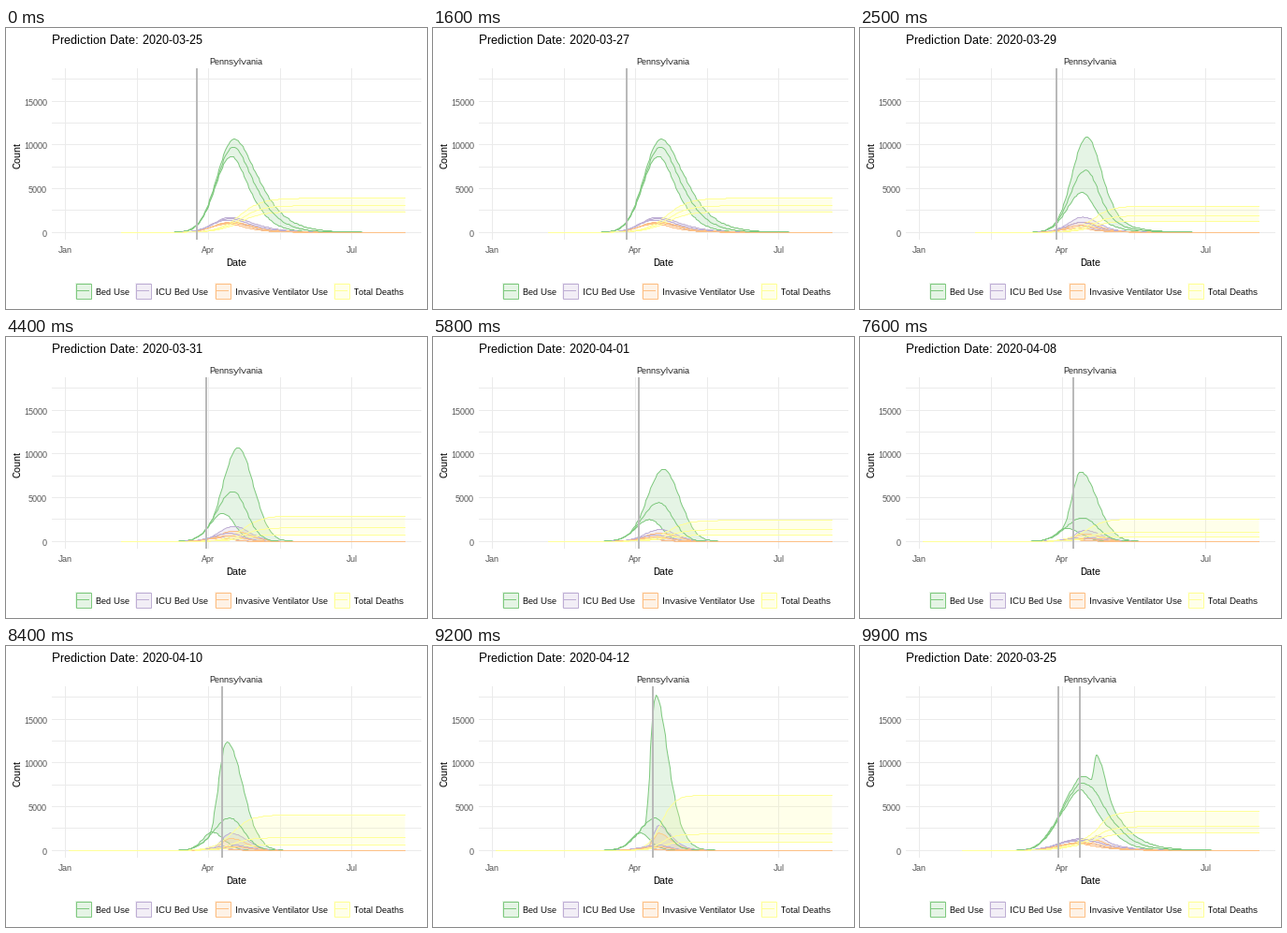
Recreate the animation shown at these times as a matplotlib script. Size 450 by 300 pixels, loop 10 s.

```python
import numpy as np
import matplotlib as mpl
import matplotlib.pyplot as plt
from matplotlib.animation import FuncAnimation
from matplotlib.patches import Polygon, Rectangle

mpl.rcParams.update({
    "font.family": "Liberation Sans",
    "text.hinting": "native",
    "text.hinting_factor": 1,
})

W, H, DPI = 450, 300, 72
LEFT, RIGHT, TOP, BOTTOM = 49, 444, 43, 226
DAY0, DAY_PX = 62.9, 1.684            # x of 1 January, pixels per day
ZERO, COUNT_PX = 218.2, 46.67 / 5000  # y of zero, pixels per count
COLORS = GREEN, PURPLE, ORANGE, YELLOW = "#7FC97F", "#BEAED4", "#FDC086", "#FFFF99"
GRID, RULE, GREY = "#EBEBEB", "#B9B9B9", "#4D4D4D"
ICU, VENT = .16, .11                  # shares of the bed count


def day_x(day):
    return DAY0 + DAY_PX * day


X = day_x(np.arange(3, 217))
LATE = 33  # days skipped by the forecasts that begin in February


def bump(x, h, c, left, right, tail):
    """Bell with separate left and right widths and a slow right tail."""
    z = np.where(x < c, (c - x) / left, (x - c) / right)
    return h * np.exp(-.5 * z * z / np.where(x < c, 1, 1 + tail * z))


def forecast(peaks, centres, lefts, right, totals, shift=-4, tail=0):
    """Counts per day, by group and by upper, middle and lower line."""
    rights = right * np.array([1, .88, .75])

    def beds(x):
        rows = [bump(x, *p, tail) for p in zip(peaks, centres, lefts, rights)]
        rows[0] = np.maximum(rows[0], rows[1])
        return np.array(rows)

    rise = 1 / (1 + np.exp((centres[0] + 6 - X) / (.6 * right)))
    moved = beds(X - shift)
    return np.array([beds(X), ICU * moved, VENT * moved, np.outer(totals, rise)])


A = forecast((10700, 9750, 8700), (244, 243, 241), (18, 17.5, 17), 20,
             (3900, 3050, 2350), tail=.4)
B = forecast((10950, 6250, 3250), (242, 240.5, 235.5), (15, 16, 15), 15.5,
             (2700, 1520, 950))
D = forecast((10700, 5700, 3200), (248, 242.5, 232), (16, 17, 14), 16.5,
             (2900, 1550, 760))
F = forecast((3500, 1720, 960), (235, 235, 228), (14, 18, 17), 20,
             (1100, 700, 480), shift=1)
P = forecast((12350, 3700, 2100), (236, 239, 220), (9, 17, 10), 17,
             (4050, 1450, 600), shift=4)
Q = forecast((17800, 3700, 2000), (238, 238, 222), (5.5, 17, 11), 12,
             (6300, 1850, 950), shift=3, tail=.2)

# date label, day of the year, counts
STATES = [("03-25", 84, A), ("03-26", 85, A), ("03-27", 86, A),
          ("03-29", 88, B), ("03-30", 89, .7 * B + .3 * D), ("03-31", 90, D),
          ("04-01", 91, 1.27 * D), ("04-05", 95, F), ("04-07", 97, F),
          ("04-08", 98, (F + P) / 2), ("04-10", 100, P), ("04-12", 102, Q)]
STARTS = [5, 14, 23, 32, 41, 49, 57, 65, 73, 81, 89, 97]
STEPS = 4


def line(i, group, k):
    first = LATE if i < 9 else 0
    return X[first:], STATES[i][2][group, k, first:]


def pad(x, y, n):
    """Lengthen a line to n points by halving its steepest segments."""
    extra = n - len(x)
    if extra == 0:
        return x, y
    at = np.sort(np.argsort(-np.abs(np.diff(y)), kind="stable")[:extra])
    return (np.insert(x, at + 1, (x[at] + x[at + 1]) / 2),
            np.insert(y, at + 1, (y[at] + y[at + 1]) / 2))


def blend(a, b, t):
    """Mix two lines and put each point on a pixel centre."""
    n = max(len(a[0]), len(b[0]))
    x, y = ((1 - t) * p + t * q for p, q in zip(pad(*a, n), pad(*b, n)))
    return np.column_stack([np.floor(x), np.floor(ZERO - COUNT_PX * y)]) + .5


fig = plt.figure(figsize=(W / DPI, H / DPI), dpi=DPI, facecolor="white")
ax = fig.add_axes([0, 0, 1, 1])
ax.set_xlim(0, W)
ax.set_ylim(H, 0)
ax.axis("off")


def box(x, y, w, h, color, z=0):
    return ax.add_patch(Rectangle((x, y), w, h, fc=color, ec="none", zorder=z))


def label(x, y, s, size=9, color="black", ha="left"):
    return ax.text(x, y, s, fontsize=size, color=color, ha=ha, va="baseline")


# grid and axes
for count in range(0, 17501, 2500):
    row = int(ZERO - COUNT_PX * count)
    box(LEFT, row, RIGHT - LEFT, 1, GRID)
    if count % 5000 == 0:
        label(44, row + 5, str(count), color=GREY, ha="right")
for day in np.linspace(0, 182, 5):
    box(int(day_x(day) + .5), TOP, 1, BOTTOM - TOP, GRID)
for day, month in ((0, "Jan"), (91, "Apr"), (182, "Jul")):
    label(day_x(day), 240, month, color=GREY, ha="center")
label(246, 39, "Pennsylvania", color="#1A1A1A", ha="center")
label(246, 254, "Date", 11, ha="center")
ax.text(18, 136, "Count", fontsize=11, rotation=90, ha="right", va="center")
title = label(49, 17, "", 13)

# legend
names = "Bed Use", "ICU Bed Use", "Invasive Ventilator Use", "Total Deaths"
for x, color, name in zip((74, 138, 223, 350), COLORS, names):
    box(x, 272, 17, 17, mpl.colors.to_rgba(color, .2))
    ax.add_patch(Rectangle((x + .5, 272.5), 16, 16, fill=False, ec=color, lw=1))
    box(x + 2, 280, 13, 1, color, 2)
    label(x + 22, 285, name)

# moving parts
bands, curves = [], []
for g, color in enumerate(COLORS):
    band = Polygon(np.zeros((3, 2)), fc=color, ec="none", alpha=.2, zorder=3 + g)
    bands.append(ax.add_patch(band))
    curves.append([ax.plot([], [], color=color, lw=1, snap=False, zorder=z)[0]
                   for z in (3.5 + g, 7.5 + g, 3.5 + g)])
rule, old_rule = (box(0, TOP, 2, BOTTOM - TOP, RULE, 20) for _ in range(2))


def place(bar, day):
    bar.set_x(int(day_x(day) + .5) - 1)


def draw(n):
    i = sum(s <= n for s in STARTS)
    t = min(1, (n - STARTS[i - 1] + 1) / STEPS) if i else 1
    a, b = max(i - 1, 0), i % len(STATES)
    title.set_text("Prediction Date: 2020-" + STATES[b if t > .5 else a][0])
    place(rule, (1 - t) * STATES[a][1] + t * STATES[b][1])
    place(old_rule, STATES[a][1])
    old_rule.set_visible(i == len(STATES))
    for g, (band, trio) in enumerate(zip(bands, curves)):
        paths = [blend(line(a, g, k), line(b, g, k), t) for k in range(3)]
        for curve, path in zip(trio, paths):
            curve.set_data(*path.T)
        band.set_xy(np.vstack([paths[0], paths[2][::-1]]))
    return [title, rule, old_rule, *bands, *sum(curves, [])]


anim = FuncAnimation(fig, draw, frames=100, interval=100, repeat=True,
                     init_func=lambda: draw(0), blit=False)
plt.show()
```
